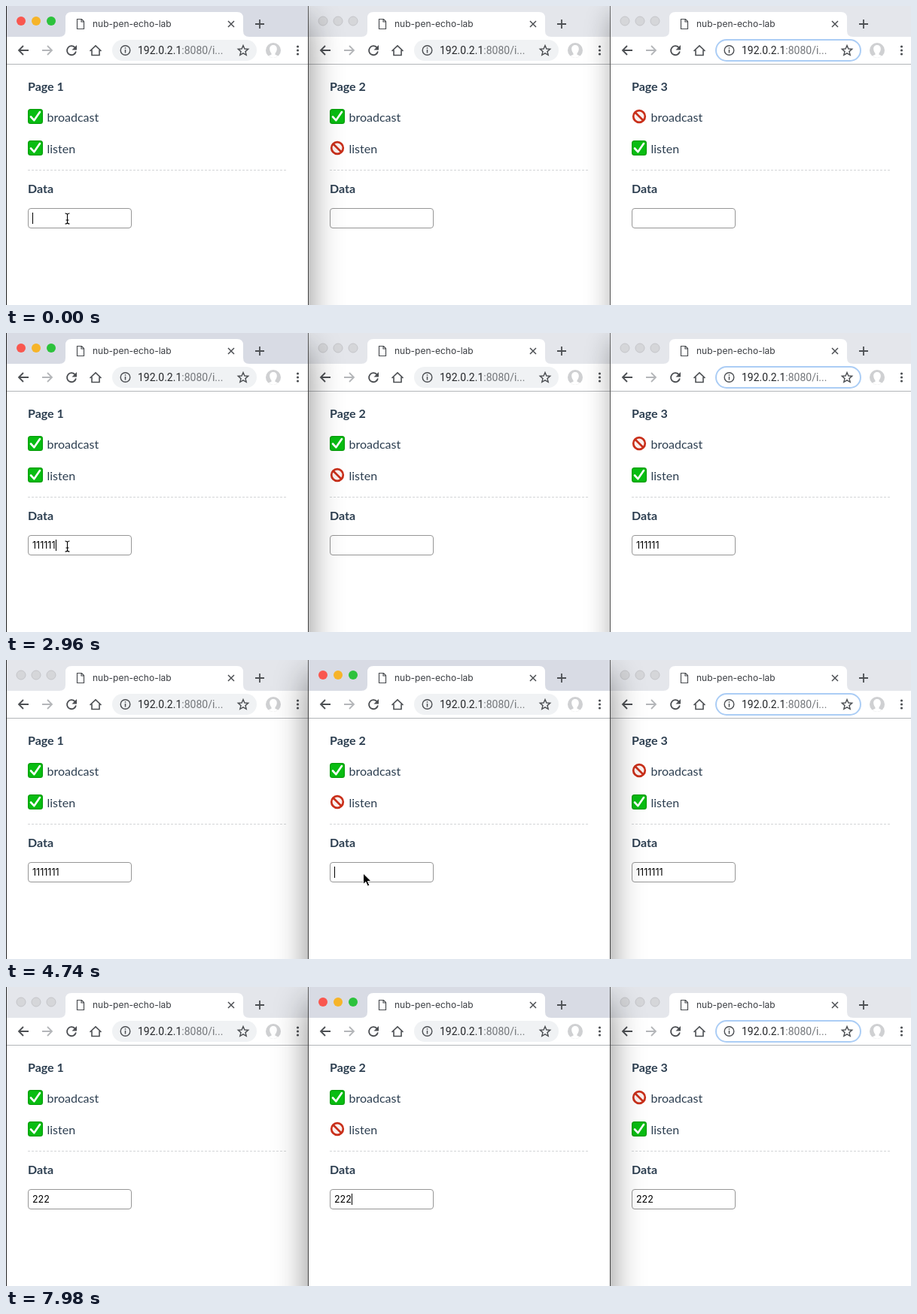
Write an HTML page that moves like this. It is 1202 px wide and 398 px high and loops after 8 s.

```html
<!DOCTYPE html>
<html lang="en">
<head>
<meta charset="utf-8">
<title>Tab sync</title>
<style>
  html, body { margin: 0; width: 100%; height: 100%; overflow: hidden; background: #777; }
  #stage { position: relative; width: 1202px; height: 398px; overflow: hidden; }
  #stage::before { content: ""; position: absolute; width: 1px; height: 398px; background: #2a2a2a; }
  .window {
    position: absolute; top: 0; width: 400px; height: 460px; z-index: 1;
    background: #fff; box-shadow: 0 12px 32px rgba(0, 0, 0, .32);
  }
  .window.raised { z-index: 2; }
  .window.active { z-index: 3; box-shadow: 0 0 0 1px rgba(0, 0, 0, .12), 0 20px 42px rgba(0, 0, 0, .48); }
  svg { position: absolute; left: 0; top: 0; display: block; }
  .strip { fill: #e4e6eb; }
  .active .strip { fill: #d8dbe4; }
  .light { fill: #d5d6d9; stroke: #c4c5c9; stroke-width: 1; }
  .active .light { fill: var(--c); stroke: none; }
  .icon { fill: none; stroke: #4c4f53; stroke-width: 1.8; }
  .title { font: 12px Inter, sans-serif; fill: #3a3d42; }
  .url { font: 14px Roboto, sans-serif; fill: #26282b; }
  .page { font: 16px Lato, sans-serif; fill: #2c3e50; }
  .bold { font-weight: 700; }
  .field {
    position: absolute; left: 28px; top: 269px; width: 138px; height: 27px;
    box-sizing: border-box; padding-left: 5px; border: 1px solid #969696; border-radius: 4px;
    background: #fff; font: 12.5px/25px Inter, sans-serif; color: #000; white-space: nowrap;
  }
  .caret { display: inline-block; width: 1px; height: 15px; background: #000; vertical-align: -3px; visibility: hidden; }
  #pointer { z-index: 4; pointer-events: none; }
</style>
</head>
<body>
<div id="stage">
  <svg id="pointer" width="1202" height="398">
    <g id="cursor">
      <path id="arrow" d="M0 0V14.5L3.4 11.4L5.8 17L8.3 15.9L5.9 10.5H10.5Z" fill="#000" stroke="#fff" stroke-width="1"/>
      <g id="beam" fill="none">
        <path id="beamLine" d="M-3 -7Q0 -7 0 -5Q0 -7 3 -7M0 -5V5M-3 7Q0 7 0 5Q0 7 3 7M-2 2H2" stroke="#fff" stroke-width="2.6"/>
        <path d="M-3 -7Q0 -7 0 -5Q0 -7 3 -7M0 -5V5M-3 7Q0 7 0 5Q0 7 3 7M-2 2H2" stroke="#000" stroke-width="1.1"/>
      </g>
    </g>
  </svg>
</div>
<script>
const LOOP = 8000;
const PITCH = 401;
const FOCUS_AT = 4450;
const SYNC_LAG = 120;
const BEAM_AT = 5060;
const firstKeys = [650, 1050, 1450, 1850, 2280, 2700, 3120];
const secondKeys = [6860, 7300, 7720];
const caretResets = [0, ...firstKeys, FOCUS_AT, ...secondKeys];
// time, x, y
const pointerPath = [
  [0, 81, 283], [1700, 81, 283], [1900, 81, 284], [3420, 81, 284], [3600, 140, 303],
  [3840, 320, 311], [4080, 468, 292], [4300, 468, 292], [4420, 474, 284], [LOOP, 474, 284]
];
const stage = document.getElementById('stage');
const cursor = document.getElementById('cursor');
const arrow = document.getElementById('arrow');
const beam = document.getElementById('beam');

const allowed = y => `
  <rect x="29" y="${y - 10}" width="20" height="20" rx="3.5" fill="#079d0b"/>
  <rect x="30.2" y="${y - 8.8}" width="17.6" height="17.6" rx="2.5" fill="#08bd12"/>
  <path d="M33 ${y + .5}L37.3 ${y + 5.2}L45 ${y - 6}" fill="none" stroke="#fff" stroke-width="2.6" stroke-linecap="round" stroke-linejoin="round"/>`;

const denied = y => `
  <g fill="none" stroke="#c9301b" stroke-width="2.7">
    <circle cx="39" cy="${y}" r="7.8" fill="#fbf1ef"/>
    <path d="M33.5 ${y - 5.5}L44.5 ${y + 5.5}"/>
  </g>`;

const option = (label, on, y) => `
  ${(on ? allowed : denied)(y)}
  <text class="page" x="54.5" y="${y + 7}">${label}</text>`;

const lights = ['#f9574f', '#f6b429', '#2cc23c'].map((color, i) =>
  `<circle class="light" style="--c:${color}" cx="${20 + 20 * i}" cy="20" r="6"/>`).join('');

const tabStrip = `
  <rect class="strip" width="402" height="41"/>
  ${lights}
  <path d="M71 41Q79 41 79 33V16Q79 8 87 8H307Q315 8 315 16V33Q315 41 323 41Z" fill="#fff"/>
  <path class="icon" style="stroke-width:1.2" d="M94.5 17.5H100.5L103.500 20.500V30.500H94.5ZM100 17.5V21H103.5"/>
  <text class="title" x="115" y="28">nub-pen-echo-lab</text>
  <path class="icon" style="stroke-width:1.5" d="M295 20L303 28M303 20L295 28"/>
  <path class="icon" d="M331 24H343M337 18V30"/>`;

const toolbar = focused => `
  <path class="icon" d="M30 59H17.500M23 53L17 59L23 65"/>
  <path class="icon" style="stroke:#b4b6b9" d="M48 59H60.500M55 53L61 59L55 65"/>
  <path class="icon" d="M91.500 55.200A6 6 0 1 0 92.900 60.500"/>
  <path d="M94 52V58.500H87.500Z" fill="#4c4f53"/>
  <path class="icon" style="stroke-width:1.6" d="M111.500 60L119 52.800L126.500 60M114 58.500V65.500H124V58.500"/>
  ${focused
    ? '<rect x="141" y="45" width="192" height="28" rx="14" fill="#fff" stroke="#abcdf5" stroke-width="2"/>'
    : '<rect x="141" y="45" width="192" height="28" rx="14" fill="#f0f2f4"/>'}
  <circle class="icon" style="stroke-width:1.4" cx="158.500" cy="59" r="6.300"/>
  <path class="icon" style="stroke-width:1.5" d="M158.500 58V62.500M158.500 55.300V56.800"/>
  <text class="url" x="175" y="64">192.0.2.1<tspan fill="#74777b">:8080/i...</tspan></text>
  <path class="icon" style="stroke-width:1.400" d="M315 52.500L316.900 57L321.700 57.400L318 60.600L319.200 65.300L315 62.800L310.800 65.300L312 60.600L308.300 57.400L313.100 57Z"/>
  <circle cx="355" cy="59" r="10" fill="#cfd0d2"/>
  <path d="M355 52C351.500 52 350 54.500 350.200 57.500C350.400 60 351.500 62 352.500 63V64.800L348.500 66.600Q355 71.500 361.500 66.600L357.500 64.800V63C358.500 62 359.600 60 359.800 57.500C360 54.500 358.500 52 355 52Z" fill="#fff"/>
  ${[54, 59, 64].map(y => `<circle cx="387.500" cy="${y}" r="1.600" fill="#4c4f53"/>`).join('')}
  <path d="M0 77.500H402" stroke="#b3b5b8"/>`;

function makeWindow(index, broadcasts, listens) {
  const el = document.createElement('div');
  el.className = 'window' + (index === 2 ? ' raised' : '');
  el.style.left = 1 + PITCH * index + 'px';
  el.innerHTML = `
    <svg width="400" height="398" viewBox="1 0 400 398">
      ${tabStrip}
      ${toolbar(index === 2)}
      <text class="page bold" x="29" y="113">Page ${index + 1}</text>
      ${option('broadcast', broadcasts, 147)}
      ${option('listen', listens, 189)}
      <path d="M29 218.500H373" stroke="#d3d5d7" stroke-dasharray="3 2"/>
      <text class="page bold" x="29" y="249">Data</text>
    </svg>
    <div class="field"><span></span><i class="caret"></i></div>`;
  stage.append(el);
  return { el, text: el.querySelector('span'), caret: el.querySelector('.caret') };
}

const windows = [makeWindow(0, true, true), makeWindow(1, true, false), makeWindow(2, false, true)];

const countUntil = (times, t) => times.filter(time => time <= t).length;

function pointerAt(t) {
  const next = Math.max(1, pointerPath.findIndex(point => point[0] > t));
  const [t0, x0, y0] = pointerPath[next - 1];
  const [t1, x1, y1] = pointerPath[next];
  const k = (t - t0) / (t1 - t0);
  return [x0 + (x1 - x0) * k, y0 + (y1 - y0) * k];
}

function draw(t) {
  const ones = time => '1'.repeat(countUntil(firstKeys, time));
  const twos = time => '2'.repeat(countUntil(secondKeys, time));
  const received = twos(t - SYNC_LAG);
  windows[0].text.textContent = received || ones(t);
  windows[1].text.textContent = twos(t);
  windows[2].text.textContent = received || ones(t - SYNC_LAG);

  const focused = t < FOCUS_AT ? 0 : 1;
  const lastReset = caretResets[countUntil(caretResets, t) - 1];
  const caretOn = (t - lastReset) % 1000 < 500;
  windows.forEach(({ el, caret }, i) => {
    el.classList.toggle('active', i === focused);
    caret.style.visibility = i === focused && caretOn ? 'visible' : 'hidden';
  });

  const [x, y] = pointerAt(t);
  const isArrow = y > 296 || (t > 3600 && t < BEAM_AT);
  cursor.setAttribute('transform', `translate(${Math.round(x) + .5} ${Math.round(y)})`);
  cursor.style.display = t < secondKeys[0] ? '' : 'none';
  arrow.style.display = isArrow ? '' : 'none';
  beam.style.display = isArrow ? 'none' : '';
}

const start = performance.now();
function tick() {
  draw((performance.now() - start) % LOOP);
  requestAnimationFrame(tick);
}
tick();
</script>
</body>
</html>
```
